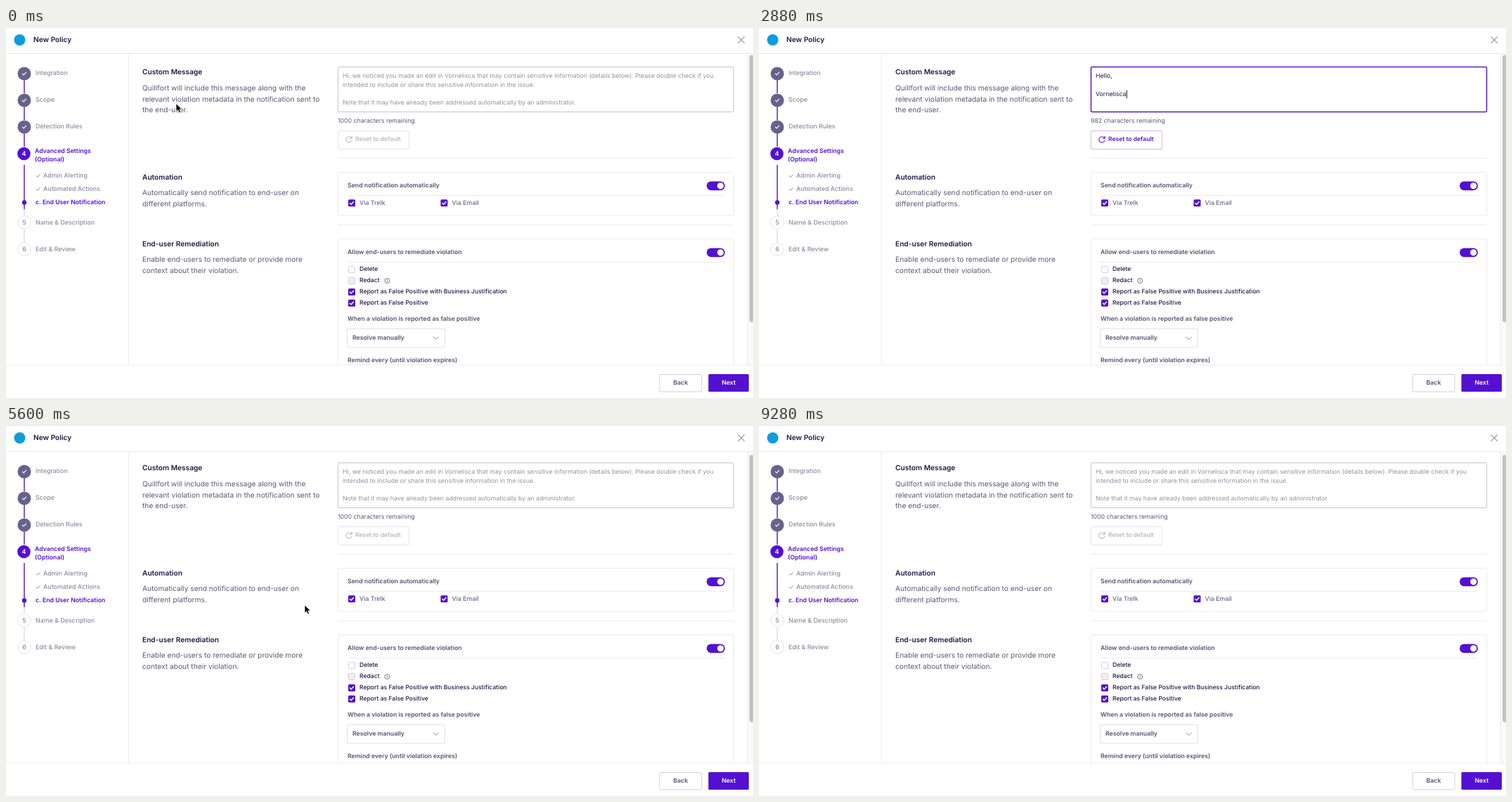
Animation, 1063 px wide and 527 px high, one loop 9.6 s. Source, as an HTML page:

```html
<!DOCTYPE html>
<html lang="en">
<head>
<meta charset="utf-8">
<title>New Policy</title>
<style>
html, body { margin: 0; width: 100%; height: 100%; overflow: hidden; background: #fff; }
svg { display: block; width: 100%; height: 100%; --purple: #5410d0; --ink: #1f1747; --line: #ebeaf0; }
text { font: 500 8.9px Inter, sans-serif; dominant-baseline: central; text-rendering: geometricPrecision; fill: var(--ink); white-space: pre; }
.title { font-size: 10.17px; font-weight: 600; }
.desc { font-size: 10.23px; font-weight: 400; fill: #5c5878; }
.step { fill: #8c89a3; }
.current { font-size: 8.73px; font-weight: 600; fill: var(--purple); }
.num { font-size: 9px; text-anchor: middle; fill: #8c89a3; }
.label { font-size: 8.74px; font-weight: 600; fill: #565174; }
.option { font-size: 8.6px; }
.soft { font-size: 8.8px; fill: #6b6785; }
.hint { font-size: 8.78px; font-weight: 400; fill: #94919f; }
.typed { font-size: 8.78px; font-weight: 400; }
.count { font-size: 8.74px; font-weight: 400; fill: #5c5878; }
.mid { font-size: 8.75px; font-weight: 600; text-anchor: middle; }
.box { fill: #fff; stroke: var(--line); }
.rule { stroke: var(--line); }
.thin { fill: none; stroke-linecap: round; stroke-linejoin: round; }
.purple { fill: var(--purple); }

#reset rect { fill: #fff; stroke: #e5e3eb; }
#reset text { font-size: 8.55px; font-weight: 600; fill: #b9b6c6; }
#reset path { stroke: #b9b6c6; stroke-width: 1.1; }
#reset.on rect { stroke: #c9bbea; }
#reset.on text { fill: var(--purple); }
#reset.on path { stroke: var(--purple); }
#reset.on.hover rect { fill: #e9e1f8; stroke: #b6a2e2; }

#scroll { animation: scroll 9600ms linear infinite; }
#thumb { animation: thumb 9600ms linear infinite; }
#focus { animation: focus 9600ms step-end infinite; }
#pointer { animation: move 9600ms ease-in-out infinite; }
#arrow { animation: arrow 9600ms step-end infinite; }
#beam { animation: beam 9600ms step-end infinite; }
#hand { animation: hand 9600ms step-end infinite; }
#halo { animation: halo 9600ms linear infinite; }
#ripple { animation: ripple 9600ms linear infinite; }

@keyframes scroll { 0%, 54.2% { transform: translateY(0); } 56.6%, 100% { transform: translateY(-3px); } }
@keyframes thumb { 0%, 54.2% { transform: translateY(0); } 56.6%, 100% { transform: translateY(2.5px); } }
@keyframes focus { 0% { opacity: 0; } 19.8% { opacity: 1; } 43.33%, 100% { opacity: 0; } }
@keyframes move {
  0%, 8.33% { transform: translate(242px, 107.5px); }
  16.67%, 35.4% { transform: translate(536px, 100px); }
  38.75%, 44.2% { transform: translate(528px, 165px); }
  48.33% { transform: translate(472px, 130.5px); }
  52.5%, 69.2% { transform: translate(425px, 255px); }
  76.7%, 100% { transform: translate(1007px, 220.5px); }
}
@keyframes arrow { 0% { opacity: 1; } 13.85% { opacity: 0; } 46.35% { opacity: 1; } 75.8%, 100% { opacity: 0; } }
@keyframes beam { 0% { opacity: 0; } 13.85% { opacity: 1; } 25% { opacity: 0; } 35.4% { opacity: 1; } 36.8%, 100% { opacity: 0; } }
@keyframes hand { 0% { opacity: 0; } 37.4% { opacity: 1; } 46.35% { opacity: 0; } 75.8% { opacity: 1; } 90.6%, 100% { opacity: 0; } }
@keyframes halo {
  0%, 19.2% { opacity: 0; } 20%, 22% { opacity: 1; } 23.6%, 41.8% { opacity: 0; }
  42.5%, 43.6% { opacity: 1; } 45%, 100% { opacity: 0; }
}
@keyframes ripple { 0%, 75.8% { opacity: 0; } 77.4%, 89% { opacity: 1; } 90.6%, 100% { opacity: 0; } }
</style>
</head>
<body>
<svg viewBox="0 0 1063 527">
  <defs>
    <clipPath id="pane"><rect x="175" y="37" width="888" height="443"/></clipPath>
    <path id="tick" class="thin" d="M-2.6 .1L-.8 1.9L2.6 -1.8"/>
    <g id="done"><circle r="9.5" fill="#67628a"/><use href="#tick" stroke="#fff" stroke-width="1.2"/></g>
    <g id="checked"><rect x="-5" y="-5" width="10" height="10" rx="1.5" class="purple"/><use href="#tick" stroke="#fff" stroke-width="1.4"/></g>
    <g id="toggle"><rect x="-13" y="-6.4" width="26" height="12.8" rx="6.4" class="purple"/><circle cx="6.7" r="4.6" fill="#fff"/></g>
  </defs>

  <!-- header -->
  <circle cx="19.5" cy="17" r="8" fill="#0d9ddb"/>
  <text x="39" y="17" class="title">New Policy</text>
  <path d="M1042 12.7l8.6 8.6m0 -8.6l-8.6 8.6" class="thin" stroke="#918ea6" stroke-width="1.1"/>
  <path d="M0 36.5H1063M174.5 37V480" class="rule"/>

  <!-- steps -->
  <path d="M26 74V93M26 112V131M26 150V169M26 195V258" stroke="#5410d0" stroke-width="1.4"/>
  <path d="M26 258V267M26 287V305" stroke="#dddbe5" stroke-width="1.4"/>
  <use href="#done" x="26" y="65"/>
  <use href="#done" x="26" y="103"/>
  <use href="#done" x="26" y="141"/>
  <circle cx="25.5" cy="179" r="9.3" class="purple"/>
  <text x="25.5" y="179" class="num" style="fill:#fff;font-weight:600">4</text>
  <circle cx="26" cy="248.5" r="3.2" class="purple"/>
  <g fill="#fff" stroke="#e4e2eb"><circle cx="26" cy="277" r="9.3"/><circle cx="26" cy="315" r="9.3"/></g>
  <text x="26" y="277" class="num">5</text>
  <text x="26" y="315" class="num">6</text>
  <text x="42" y="64.7" class="step">Integration</text>
  <text x="42" y="102.7" class="step">Scope</text>
  <text x="42" y="140.7" class="step">Detection Rules</text>
  <text x="41" y="175.5" class="current">Advanced Settings</text>
  <text x="41" y="188.2" class="current">(Optional)</text>
  <use href="#tick" x="45.7" y="210.5" stroke="#8c89a3"/>
  <use href="#tick" x="45.7" y="229.5" stroke="#8c89a3"/>
  <text x="53" y="210.5" class="step">Admin Alerting</text>
  <text x="53" y="229.5" class="step">Automated Actions</text>
  <text x="42" y="248.5" class="current">c. End User Notification</text>
  <text x="42" y="277" class="step">Name &amp; Description</text>
  <text x="42" y="315" class="step">Edit &amp; Review</text>

  <!-- scrolling pane -->
  <g clip-path="url(#pane)">
    <g id="scroll">
      <text x="194" y="63.3" class="title">Custom Message</text>
      <text x="194" y="85.7" class="desc">Quillfort will include this message along with the</text>
      <text x="194" y="101.5" class="desc">relevant violation metadata in the notification sent to</text>
      <text x="194" y="117.3" class="desc">the end-user.</text>
      <text x="194" y="213" class="title">Automation</text>
      <text x="194" y="235.3" class="desc">Automatically send notification to end-user on</text>
      <text x="194" y="251.1" class="desc">different platforms.</text>
      <text x="194" y="308" class="title">End-user Remediation</text>
      <text x="194" y="330.3" class="desc">Enable end-users to remediate or provide more</text>
      <text x="194" y="346.1" class="desc">context about their violation.</text>

      <rect x="472.5" y="55.5" width="563" height="64" rx="1.5" fill="#fff" stroke="#c6c4d0"/>
      <g id="hint">
        <text x="479" y="68.7" class="hint">Hi, we noticed you made an edit in Vornelisca that may contain sensitive information (details below). Please double check if you</text>
        <text x="479" y="81.4" class="hint">intended to include or share this sensitive information in the issue.</text>
        <text x="479" y="106.5" class="hint">Note that it may have already been addressed automatically by an administrator.</text>
      </g>
      <text x="479" y="68.7" class="typed"></text>
      <text x="479" y="81.4" class="typed"></text>
      <text x="479" y="94" class="typed"></text>
      <g id="focus">
        <rect x="472.5" y="55.5" width="563" height="64" rx="1.5" fill="none" stroke="#5a1bc6" stroke-width="1.5"/>
        <rect id="caret" width="1" height="11.5" fill="#111"/>
      </g>
      <text id="count" x="472" y="132.7" class="count"></text>
      <g id="reset">
        <rect x="472.5" y="146.5" width="101" height="26" rx="1.5"/>
        <path class="thin" d="M492 160.2A4.2 4.2 0 1 1 491.2 156.2M492.2 154.3V157.2H489.2"/>
        <text x="497" y="159">Reset to default</text>
      </g>
      <path d="M472 185.5H1036M472 280.5H1036" class="rule"/>

      <rect x="472.5" y="205.5" width="563" height="61.5" rx="1" class="box"/>
      <text x="486" y="224.7" class="label">Send notification automatically</text>
      <path d="M486 238.5H1023" class="rule"/>
      <circle id="ripple" cx="1007" cy="224" r="18" fill="#000" fill-opacity=".04"/>
      <use href="#toggle" x="1010" y="224.8"/>
      <use href="#checked" x="492" y="249.3"/>
      <text x="503" y="249.3" class="soft">Via Trelk</text>
      <use href="#checked" x="623.5" y="249.3"/>
      <text x="634.5" y="249.3" class="soft">Via Email</text>

      <rect x="472.5" y="300.5" width="563" height="240" rx="1" class="box"/>
      <path d="M486 333.5H1023" class="rule"/>
      <text x="486" y="319.8" class="label">Allow end-users to remediate violation</text>
      <use href="#toggle" x="1010" y="319.8"/>
      <g stroke="#cfcdd9">
        <rect x="487.5" y="339.7" width="9" height="9" rx="1" fill="#fff"/>
        <rect x="487.5" y="355.5" width="9" height="9" rx="1" fill="#efeef3"/>
      </g>
      <text x="503" y="344.2" class="option">Delete</text>
      <text x="503" y="360" class="option">Redact</text>
      <circle cx="542.3" cy="360" r="3.5" fill="none" stroke="#67628a" stroke-width=".9"/>
      <path d="M542.3 358.2v.4m0 1v2" class="thin" stroke="#67628a" stroke-width=".8"/>
      <use href="#checked" x="492" y="376"/>
      <text x="503" y="376" class="option">Report as False Positive with Business Justification</text>
      <use href="#checked" x="492" y="391.8"/>
      <text x="503" y="391.8" class="option">Report as False Positive</text>
      <text x="486" y="415.3" class="label">When a violation is reported as false positive</text>
      <rect x="485.5" y="428.5" width="139" height="26.5" rx="1.5" fill="#fff" stroke="#e1dfe8"/>
      <text x="493" y="441.5" class="label">Resolve manually</text>
      <path d="M608 440l3.6 3.6l3.6 -3.6" class="thin" stroke="#8c89a3"/>
      <text x="486" y="473.7" class="label">Remind every (until violation expires)</text>
    </g>
    <rect x="1055.5" y="36.5" width="9" height="444" fill="#fafafa" stroke="#e9e9e9"/>
    <rect id="thumb" x="1058" y="38.5" width="6.5" height="380.5" rx="3" fill="#c1c1c1"/>
  </g>

  <!-- footer -->
  <path d="M0 480H1063" class="rule"/>
  <rect x="930" y="493.5" width="60" height="24.5" rx="1.5" fill="#fff" stroke="#d3cfdf"/>
  <text x="960" y="505.7" class="mid" style="fill:#565174">Back</text>
  <rect x="999.5" y="493" width="57.5" height="25" rx="1.5" class="purple"/>
  <text x="1028.3" y="505.7" class="mid" style="fill:#fff">Next</text>

  <g id="pointer">
    <circle id="halo" r="29" fill="#f0d850" fill-opacity=".45"/>
    <path id="arrow" d="M0 0V11.5L2.7 9L4.5 13.2L6.6 12.3L4.8 8.2H8.4Z" stroke="#fff" stroke-width=".8"/>
    <path id="beam" class="thin" d="M-2.3 -6Q0 -6 0 -4.5Q0 -6 2.3 -6M0 -4.5V4.5M-2.3 6Q0 6 0 4.5Q0 6 2.3 6M-1.2 1.5H1.2" stroke="#111"/>
    <path id="hand" fill="#fff" stroke="#111" stroke-width=".9" stroke-linejoin="round"
      d="M-.9 .8Q0 -.6 1 .8V5Q2 4 3 5.2Q4 4.4 4.8 5.7Q6.4 5.2 6.4 7V9.2L5 12.6H-.4L-3.6 8.2Q-4 6.6 -2.4 7L-.9 8.4Z"/>
  </g>
</svg>
<script>
const LOOP = 9600, TYPE_START = 2400, TYPE_END = 3360, CLEARED = 4160, HOVERED = 3590;
const message = "Hello,\n\nVornelisca Violation Detected";
const $ = id => document.getElementById(id);
const lines = [...document.querySelectorAll(".typed")];
let start, shown = -1;

function showText(n) {
  if (n === shown) return;
  shown = n;
  const parts = message.slice(0, n).split("\n");
  lines.forEach((line, i) => line.textContent = parts[i] || "");
  const last = lines[parts.length - 1];
  $("caret").setAttribute("x", 479.3 + (last.textContent ? last.getComputedTextLength() : 0));
  $("caret").setAttribute("y", +last.getAttribute("y") - 5.5);
  $("hint").style.display = n ? "none" : "";
  $("count").textContent = `${1000 - n} characters remaining`;
}

function draw(now) {
  start ??= now;
  const t = (now - start) % LOOP;
  const progress = Math.min(1, Math.max(0, (t - TYPE_START) / (TYPE_END - TYPE_START)));
  const n = t < CLEARED ? Math.floor(progress * message.length) : 0;
  showText(n);
  $("reset").classList.toggle("on", n > 0);
  $("reset").classList.toggle("hover", t >= HOVERED && t < CLEARED);
  requestAnimationFrame(draw);
}
showText(0);
requestAnimationFrame(draw);
</script>
</body>
</html>
```
